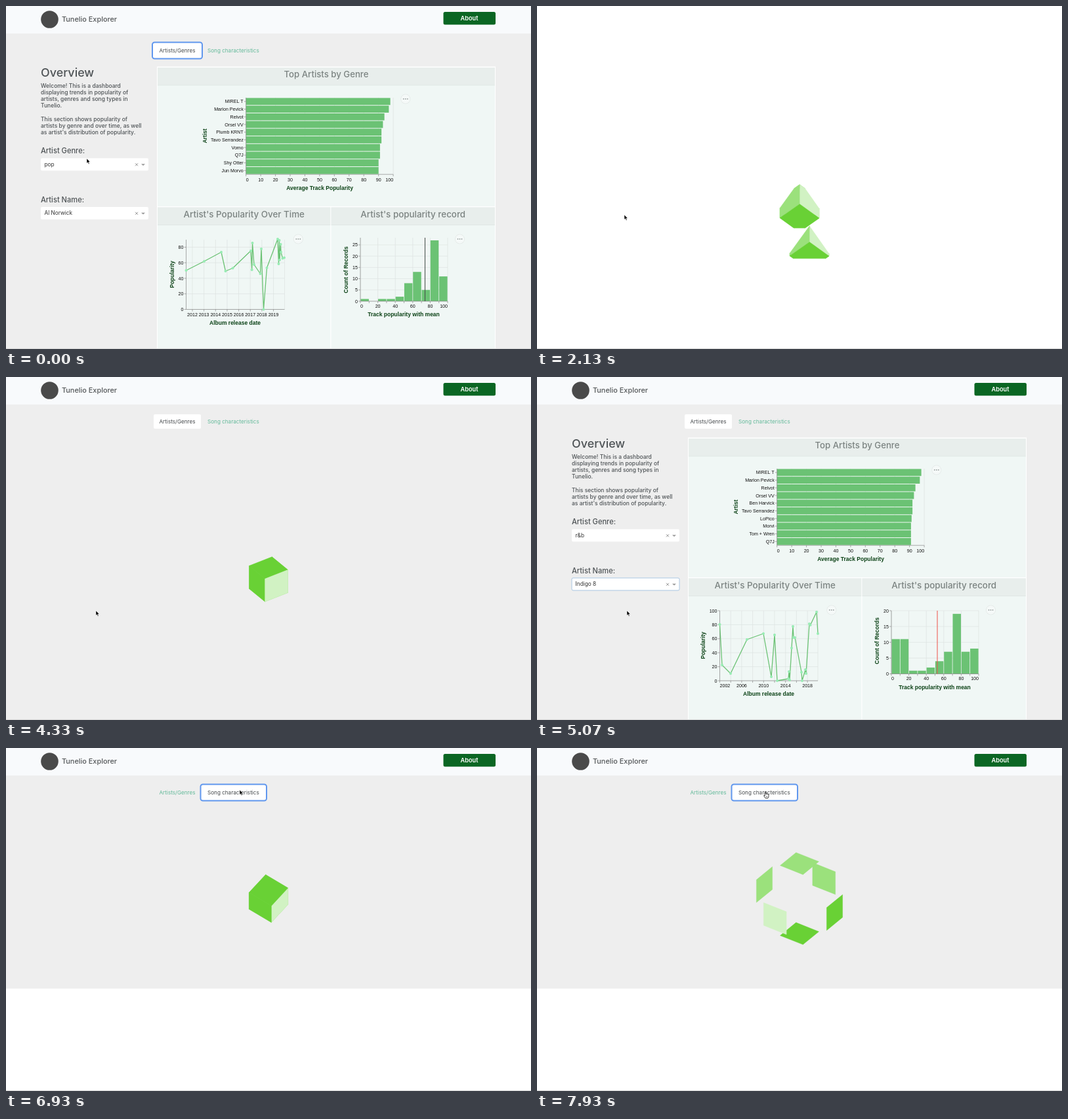
These frames come from a looping animation (800x524 px, 8 s). An HTML page with a canvas:

```html
<!DOCTYPE html>
<html lang="en">
<head>
<meta charset="utf-8">
<title>Tunelio Explorer</title>
<style>
html, body { margin: 0; width: 100%; height: 100%; overflow: hidden; background: #fff; }
canvas { display: block; width: 800px; height: 524px; }
</style>
</head>
<body>
<canvas id="stage"></canvas>
<script>
const W = 800, H = 524, LOOP = 8000;
const canvas = document.getElementById('stage');
const g = canvas.getContext('2d');
const dpr = window.devicePixelRatio || 1;
canvas.width = W * dpr;
canvas.height = H * dpr;

const UI = 'Inter, "Open Sans", sans-serif';
const CHART = '"Liberation Sans", Arial, sans-serif';
const BAR = '#6bc274', DARK = '#0b4216', GRID = '#dde3e1', AXIS = '#888';
const CUBE = { light: '#d1f2c3', mid: '#9be17c', deep: '#69d135' };

const GENRES = ['pop', 'rap', 'rock', 'r&b', 'latin', 'edm'];
const ARTISTS = ['Al Norwick', 'Indigo 8', 'Nora Velstad', 'The Lampkeepers', 'Marek Donelli', 'Mily Harden'];

const TOP = {
  pop: {
    names: ['MIREL T', 'Marlon Pevick', 'Relvot', 'Orsel VV', 'Plumb KRNT', 'Tavo Serrandez', 'Vomo', 'Q7J', 'Shy Otter', 'Jun Morvo'],
    values: [98, 97, 94, 93, 92, 92, 91, 91, 90, 90]
  },
  'r&b': {
    names: ['MIREL T', 'Marlon Pevick', 'Relvot', 'Orsel VV', 'Ben Harvick', 'Tavo Serrandez', 'LoPico', 'Morvi', 'Tom + Wren', 'Q7J'],
    values: [98, 97, 94, 93, 92, 92, 91.4, 91, 91, 91]
  }
};

const RECORDS = {
  'Al Norwick': {
    line: {
      x: 274.5, right: 424.5, top: 357, base: 463.5, unit: 1.188, yTicks: [0, 20, 40, 60, 80],
      x0: 284, first: 2012, step: 1, gap: 17.65, count: 8, labels: 1, flush: false, title: 349,
      points: [274.5, 404, 302, 390, 328, 376, 334.5, 405, 345.5, 400.5, 373, 374, 374.7, 403, 375.5, 362, 378, 395,
        387.5, 409, 389, 371, 392.5, 463.5, 397.5, 400, 414, 356, 415.5, 394, 416.5, 358, 417, 388, 418.5, 364, 419, 376, 421.5, 385.5, 424, 384.5]
    },
    hist: {
      base: 451, top: 354, unit: 3.443, ticks: 6, values: [1, 0, 1, 1, 2, 8, 13, 5, 27, 11],
      mean: 638.5, rule: '#454b48'
    }
  },
  'Indigo 8': {
    line: {
      x: 278.5, right: 428, top: 357, base: 464, unit: 1.07, yTicks: [0, 20, 40, 60, 80, 100],
      x0: 278.5, first: 2002, step: 2, gap: 16.7, count: 9, labels: 2, flush: true, title: 353,
      points: [278.5, 378, 282, 440, 295, 453, 320, 401, 345, 392, 357, 458, 362, 394, 366, 464, 383, 461, 384, 450, 385, 463,
        388, 414, 390, 381, 391, 398, 393, 398, 403, 451, 404, 464, 409, 447, 410, 453, 415, 377, 416.5, 379, 426, 359, 428, 392]
    },
    hist: {
      base: 453.5, top: 357, unit: 4.825, ticks: 5, values: [11, 11, 1, 1, 2, 4, 7, 19, 7, 8],
      mean: 610, rule: '#ee5148'
    }
  }
};

// y is the middle of the capitals
function text(s, x, y, size, color, o = {}) {
  g.font = `${o.weight || 400} ${size}px ${o.font || UI}`;
  g.textAlign = o.align || 'left';
  g.fillStyle = color;
  g.fillText(s, x, y + size * 0.36);
}
const label = (s, x, y, align) => text(s, x, y, 7.1, '#111', { font: CHART, align });
const axisTitle = (s, x, y) => text(s, x, y, 8.5, DARK, { font: CHART, weight: 700, align: 'center' });

function sideTitle(s, x, y) {
  g.save();
  g.translate(x, y);
  g.rotate(-Math.PI / 2);
  axisTitle(s, 0, 0);
  g.restore();
}

function rect(x, y, w, h, color) {
  g.fillStyle = color;
  g.fillRect(x, y, w, h);
}

function round(x, y, w, h, r, fill, stroke, lw = 1) {
  g.beginPath();
  g.roundRect(x, y, w, h, r);
  if (fill) { g.fillStyle = fill; g.fill(); }
  if (stroke) { g.strokeStyle = stroke; g.lineWidth = lw; g.stroke(); }
}

function line(x1, y1, x2, y2, color, lw = 0.7) {
  g.beginPath();
  g.moveTo(x1, y1);
  g.lineTo(x2, y2);
  g.strokeStyle = color;
  g.lineWidth = lw;
  g.stroke();
}

function poly(pts, fill, stroke, lw) {
  g.beginPath();
  pts.forEach(p => g.lineTo(p[0], p[1]));
  g.closePath();
  if (fill) { g.fillStyle = fill; g.fill(); }
  if (stroke) { g.strokeStyle = stroke; g.lineWidth = lw; g.stroke(); }
}

function disc(x, y, r, fill) {
  g.beginPath();
  g.arc(x, y, r, 0, 7);
  g.fillStyle = fill;
  g.fill();
}

function menuDots(x, y) {
  disc(x, y, 7.5, '#e2e8e6');
  disc(x, y, 6.8, '#f5f9f8');
  for (const d of [-3, 0, 3]) disc(x + d, y, 0.95, '#a3aaa8');
}

function header() {
  rect(0, 0, W, 42, '#f8fafc');
  disc(66.5, 20.5, 13.3, '#4a4a4a');
  text('Tunelio Explorer', 85, 20.5, 10.9, '#55585a', { weight: 500 });
  round(666.5, 9, 79.5, 19.5, 2.5, '#0b6623');
  text('About', 706, 18.7, 9.2, '#fff', { weight: 600, align: 'center' });
}

function tabs(active, focused, hover) {
  const boxes = [[225, 72, 'Artists/Genres', 233.5], [298.5, 96.5, 'Song characteristics', 307]];
  boxes.forEach(([x, w, name, tx], i) => {
    const on = i === active;
    if (on && focused) round(x - 2, 55.5, w + 4, 25, 3.5, '#fff', '#6097ee', 2);
    else if (on) round(x, 57, w, 22, 2, '#fff');
    else if (hover) round(x, 57, w, 22, 2, null, '#e6e9ea', 0.8);
    text(name, tx, 68, 8.15, on ? '#45494c' : hover ? '#3f9577' : '#62b999');
  });
}

function select(y, value, open, focused, caret) {
  round(53, y, 164, 19, 2, '#fff', focused ? '#a9c6e2' : null);
  text(value, 58.5, y + 9.5, 8.3, '#333');
  if (caret) line(59, y + 4.5, 59, y + 14.5, '#111', 0.8);
  for (const s of [-1, 1]) line(197, y + 9.8 - 2 * s, 201, y + 9.8 + 2 * s, '#888', 0.9);
  const d = open ? -1 : 1, ay = y + 10;
  poly([[206, ay - 1.3 * d], [212, ay - 1.3 * d], [209, ay + 1.6 * d]], '#999');
}

function dropdown(y, items, chosen, row) {
  const step = 18.7;
  rect(53.5, y, 163, 107, '#fff');
  g.save();
  g.beginPath();
  g.rect(54, y, 162, 106.5);
  g.clip();
  rect(54, y + row * step, 154.5, step, '#e5f2ff');
  items.forEach((s, i) => text(s, 58, y + 10 + i * step, 8.3, i === row ? '#777' : '#888',
    { weight: s === chosen ? 700 : 400 }));
  rect(208.5, y, 7.5, 107, '#fafafa');
  round(210.3, y + 2, 4.2, 10, 2.1, '#c1c1c1');
  g.restore();
  g.strokeStyle = '#ccc';
  g.lineWidth = 0.8;
  g.strokeRect(53.5, y, 163, 107);
}

function panel(x, y, w, h, title, size) {
  rect(x, y, w, h, '#fff');
  rect(x + 1, y + 1.5, w - 2, h, '#f0f7f5');
  rect(x + 1, y + 1.5, w - 2, 27, '#e8eeec');
  line(x + 1, y + 28.5, x + w - 1, y + 28.5, '#dde5e2', 0.8);
  text(title, x + w / 2, y + 12, size, '#7b8381', { weight: 500, align: 'center' });
}

function topChart({ names, values }) {
  const x0 = 365.7, gap = 22.44, y0 = 140, step = 11.72, base = y0 + step * 10;
  for (let i = 0; i <= 10; i++) line(x0 + i * gap, y0, x0 + i * gap, base, GRID);
  names.forEach((s, i) => {
    const y = y0 + i * step, mid = y + step / 2;
    rect(x0, y + 0.5, values[i] * gap / 10, step - 1, BAR);
    line(x0 - 3, mid, x0, mid, AXIS);
    label(s, x0 - 4, mid, 'right');
  });
  line(x0, y0, x0, base, AXIS);
  line(x0, base, x0 + gap * 10, base, AXIS);
  for (let i = 0; i <= 10; i++) {
    const x = x0 + i * gap;
    line(x, base, x, base + 3, AXIS);
    label(i * 10, x, 265, i === 0 ? 'left' : i === 10 ? 'right' : 'center');
  }
  axisTitle('Average Track Popularity', 478, 278);
  sideTitle('Artist', 303, 198.5);
  menuDots(608.8, 142);
}

function lineChart(c) {
  for (const v of c.yTicks) {
    const y = c.base - v * c.unit;
    line(c.x, y, c.right, y, GRID);
    line(c.x - 3, y, c.x, y, AXIS);
    label(v, c.x - 4, y, 'right');
  }
  for (let i = 0; i < c.count; i++) {
    const x = c.x0 + i * c.gap;
    line(x, c.top, x, c.base, GRID);
    line(x, c.base, x, c.base + 3, AXIS);
    if (i % c.labels === 0) label(c.first + i * c.step, x, 471, c.flush && i === 0 ? 'left' : 'center');
  }
  line(c.right, c.top, c.right, c.base, GRID);
  line(c.x, c.top, c.x, c.base, AXIS);
  line(c.x, c.base, c.right, c.base, AXIS);
  const pts = [];
  for (let i = 0; i < c.points.length; i += 2) pts.push([c.points[i], c.points[i + 1]]);
  g.beginPath();
  pts.forEach(p => g.lineTo(p[0], p[1]));
  g.strokeStyle = BAR;
  g.lineWidth = 1.3;
  g.lineJoin = 'round';
  g.stroke();
  pts.forEach(p => disc(p[0], p[1], 2, '#98ecb4'));
  axisTitle('Album release date', c.title, 484);
  sideTitle('Popularity', 253, 410);
  menuDots(c.right + 20.8, 356);
}

function histogram(c) {
  const x0 = 540, gap = 13.3, right = x0 + gap * 10;
  for (let i = 0; i < c.ticks; i++) {
    const y = c.base - i * 5 * c.unit;
    line(x0, y, right, y, GRID);
    line(x0 - 3, y, x0, y, AXIS);
    label(i * 5, x0 - 4, y, 'right');
  }
  for (let i = 0; i <= 10; i += 2) line(x0 + i * gap, c.top, x0 + i * gap, c.base, GRID);
  c.values.forEach((v, i) => rect(x0 + i * gap + 0.4, c.base - v * c.unit, gap - 0.8, v * c.unit, BAR));
  line(x0, c.top, x0, c.base, AXIS);
  line(x0, c.base, right, c.base, AXIS);
  for (let i = 0; i <= 10; i++) {
    const x = x0 + i * gap;
    line(x, c.base, x, c.base + 3, AXIS);
    if (i % 2 === 0) label(i * 10, x, c.base + 7, i === 0 ? 'left' : i === 10 ? 'right' : 'center');
  }
  line(c.mean, c.top, c.mean, c.base, c.rule, 1);
  axisTitle('Track popularity with mean', 606, c.base + 20);
  sideTitle('Count of Records', 518, 403);
  menuDots(691.5, 356);
}

function sidebar() {
  const ink = '#4e5356', m = { weight: 500 };
  text('Overview', 53, 102, 17.9, ink, m);
  const rows = ['Welcome! This is a dashboard', 'displaying trends in popularity of', 'artists, genres and song types in',
    'Tunelio.', '', 'This section shows popularity of', 'artists by genre and over time, as well', "as artist's distribution of popularity."];
  rows.forEach((s, i) => text(s, 53, 121.7 + i * 10.2, 8.5, ink, m));
  text('Artist Genre:', 53, 221.5, 11.1, ink, m);
  text('Artist Name:', 53, 296.5, 11.1, ink, m);
}

function dashboard(s) {
  sidebar();
  panel(230, 92.5, 516, 213.5, 'Top Artists by Genre', 13.2);
  panel(230, 306, 265.5, 218, "Artist's Popularity Over Time", 13.4);
  panel(494.5, 306, 251.5, 218, "Artist's popularity record", 13.4);
  topChart(TOP[s.genre]);
  lineChart(RECORDS[s.artist].line);
  histogram(RECORDS[s.artist].hist);
  const row = top => Math.max(0, Math.min(4, Math.floor((s.mouse[1] + 1 - top) / 18.7)));
  select(232.5, s.genre, s.menu === 'genre', false, s.menu === 'genre' && s.caret);
  select(307, s.artist, s.menu === 'artist', s.nameFocus, s.menu === 'artist' && s.caret);
  if (s.menu === 'genre') dropdown(251.5, GENRES, s.genre, row(251.5));
  if (s.menu === 'artist') dropdown(326.5, ARTISTS, s.artist, row(326.5));
}

const ramp = (a, b, t) => {
  const u = Math.max(0, Math.min(1, (t - a) / (b - a)));
  return u * u * (3 - 2 * u);
};

// Keeps the part of a polygon nearer than depth z
function clipDepth(pts, z) {
  const out = [];
  pts.forEach((p, i) => {
    const q = pts[(i + 1) % pts.length];
    if (p[2] >= z) out.push(p);
    if ((p[2] >= z) !== (q[2] >= z)) {
      const u = (z - p[2]) / (q[2] - p[2]);
      out.push(p.map((v, k) => v + (q[k] - v) * u));
    }
  });
  return out;
}

const FACES = [[0, 0, 1, 'light'], [1, 0, 0, 'deep'], [0, 0, -1, 'mid'], [-1, 0, 0, 'mid'], [0, -1, 0, 'mid'], [0, 1, 0, 'deep']];

// Tumbles by the same angle about x and y, then breaks apart
function cube(cx, cy, age, depth = -1e3) {
  age = Math.max(0, age);
  const a = 2 * Math.PI * (1 - Math.exp(-age / 526)), c = Math.cos(a), s = Math.sin(a);
  const h = 21.2, d = h + 44 * ramp(720, 1230, age);
  const turn = ([x, y, z]) => {
    const z1 = z * c - x * s;
    return [x * c + z * s, y * c - z1 * s, y * s + z1 * c];
  };
  FACES.map(([x, y, z, tone]) => {
    const n = [x, y, z], u = [y, z, x], v = [z, x, y];
    const pts = [[1, 1], [1, -1], [-1, -1], [-1, 1]].map(([i, j]) =>
      turn(n.map((e, k) => e * d + (u[k] * i + v[k] * j) * h)));
    return { pts, tone, z: turn(n)[2] };
  }).sort((p, q) => p.z - q.z).forEach(f => {
    const pts = clipDepth(f.pts, depth).map(p => [p[0] + cx, p[1] + cy]);
    if (pts.length > 2) poly(pts, CUBE[f.tone], CUBE[f.tone], 0.4);
  });
}

const POINTER = {
  arrow(x, y) {
    const p = [[0, 0], [0, 7.3], [1.7, 5.8], [2.9, 8.5], [4.1, 8], [2.9, 5.3], [5.2, 5.2]];
    poly(p.map(q => [q[0] + x, q[1] + y]), '#000', '#fff', 0.5);
  },
  hand(x, y) {
    const p = [[-0.8, 0.4], [0, 0], [0.8, 0.5], [0.9, 3.4], [2.4, 3.2], [3.8, 3.6], [5, 4.3], [5, 7], [4, 9.6], [0, 9.6], [-2.4, 6], [-1.9, 5.2], [-0.8, 6]];
    poly(p.map(q => [q[0] + x, q[1] + y]), '#fff', '#111', 0.8);
    for (const k of [1.2, 2.6]) line(x + k, y + 6, x + k, y + 8, '#333', 0.5);
  },
  beam(x, y) {
    line(x + 0.5, y - 3.5, x + 0.5, y + 4, '#111', 0.9);
    for (const dy of [-3.5, 4]) line(x - 1, y + dy, x + 2, y + dy, '#111', 0.8);
  }
};

const PATH = [[0, 123, 233], [70, 123, 233], [270, 126, 242], [1000, 126, 242], [1730, 133, 319], [3270, 133, 319],
  [3800, 137, 357], [5350, 137, 357], [6220, 350, 78], [6400, 356, 64], [7700, 356, 64], [7900, 348, 67], [LOOP, 348, 67]];
const KINDS = [[0, 'arrow'], [270, 'beam'], [1100, 'hand'], [2070, 'arrow'], [2600, 'beam'], [3400, 'hand'],
  [4070, 'arrow'], [6270, 'hand'], [6670, 'arrow'], [7700, 'hand']];
const VIEWS = [[0, 'dash'], [2070, 'blank'], [2270, 'wait'], [2600, 'dash'], [4070, 'wait'], [4860, 'dash'], [6670, 'short']];
const MENUS = [[0, ''], [670, 'genre'], [2070, ''], [2790, 'artist'], [4070, '']];

const at = (list, t) => list.filter(e => e[0] <= t).pop()[1];

function mouseAt(t) {
  const i = Math.max(1, PATH.findIndex(p => p[0] > t));
  const [t0, x0, y0] = PATH[i - 1], [t1, x1, y1] = PATH[i];
  const u = ramp(t0, t1, t);
  return [x0 + (x1 - x0) * u, y0 + (y1 - y0) * u];
}

function draw(t) {
  const view = at(VIEWS, t), mouse = mouseAt(t), second = t >= 6530;
  g.setTransform(dpr, 0, 0, dpr, 0, 0);
  rect(0, 0, W, H, '#fff');
  if (view === 'blank') {
    cube(415, 367, t - 2060, 11.2);
    cube(400, 309, t - 2060, 0);
  } else {
    rect(0, 0, W, view === 'short' ? 367.5 : H, '#eee');
    header();
    tabs(second ? 1 : 0, second || t < 670, t >= 6270 && !second);
    if (view === 'dash') {
      dashboard({
        mouse,
        genre: t < 2070 ? 'pop' : 'r&b',
        artist: ARTISTS[t < 4070 ? 0 : 1],
        menu: at(MENUS, t),
        caret: t < 3930,
        nameFocus: t >= 4070 && !second
      });
    } else if (view === 'wait') {
      cube(400, 309, t - (t < 4000 ? 2060 : 4059));
    } else {
      cube(400, 230, t - 6703);
    }
  }
  rect(0, 523, W, 1, '#d6d6d6');
  POINTER[at(KINDS, t)](...mouse);
}

const start = performance.now();
function tick() {
  draw((performance.now() - start) % LOOP);
  requestAnimationFrame(tick);
}
tick();
</script>
</body>
</html>
```
